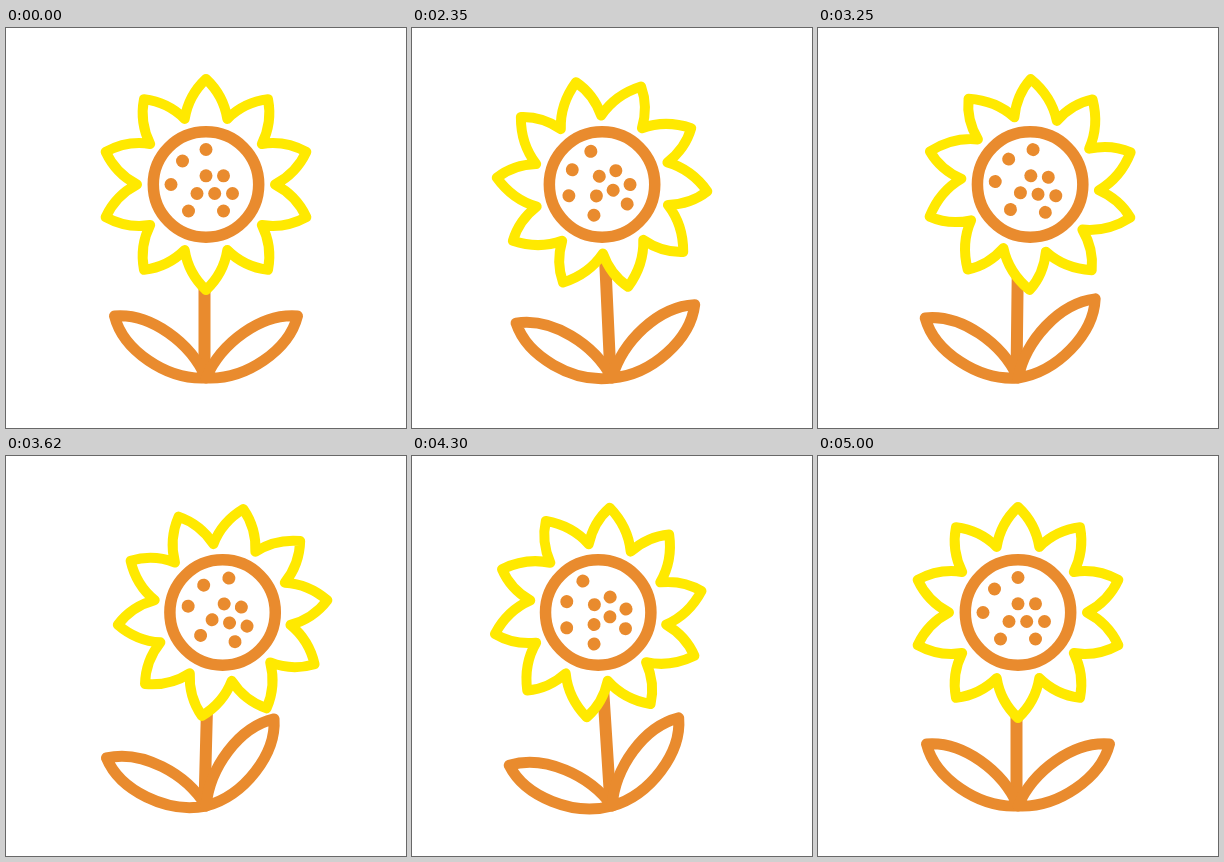
Recreate the animation shown at these times as an HTML page. Size 400x400 px, loop 5.02 s.

```html
<!DOCTYPE html>
<html lang="en">
<head>
<meta charset="utf-8">
<title>Swaying sunflower</title>
<style>
  html, body { margin: 0; width: 100%; height: 100%; overflow: hidden; background: #fff; }
  svg { display: block; width: 100%; height: 100%; }
</style>
</head>
<body>
<svg viewBox="0 0 400 400" fill="none" stroke-linecap="round" stroke-linejoin="round">
  <g stroke="#e98b2e" stroke-width="11">
    <path id="stem" d="M198.500 348V200" stroke-width="12"/>
    <path id="leftLeaf" d="M200 350C185 315 145 285 108.500 288C117 322 160 352 200 350Z"/>
    <path id="rightLeaf" d="M200 350C215 315 255 285 291.500 288C283 322 240 352 200 350Z"/>
  </g>
  <g id="head">
    <g id="flower">
      <path id="petals" fill="#fff" stroke="#ffe900" stroke-width="10"/>
      <g id="seeds" fill="#e98b2e"></g>
    </g>
    <circle r="52.700" stroke="#e98b2e" stroke-width="11.500"/>
  </g>
</svg>
<script>
const LOOP = 5020, START = 2000;
const PETALS = 10;
const el = id => document.getElementById(id);

// Key times with the value each part reaches, eased in and out between them.
const SWAY_TIMES = [START, 2620, 3520, 4070, 4940];
const LEAF_TIMES = [START, 2720, 3250, 4040, 4800];
const tracks = {
  headX: [SWAY_TIMES, [0, -16.5, 19.5, -16.5, 0]],
  flower: [SWAY_TIMES, [0, -31, 14, -31, 0]],
  stem: [SWAY_TIMES, [0, -4.4, 2, -4.4, 0]],
  leftLeaf: [LEAF_TIMES, [0, -9, -1.2, -17, 0]],
  rightLeaf: [LEAF_TIMES, [0, -15.5, -11.6, -25.5, 0]],
  // Petal tips trail behind the turning flower.
  tipDrag: [[START, 2320, 2780, 3300, 3850, 4450, 4980], [0, 4.5, -4.5, -4.5, 4.2, -5.2, 0]]
};

function valueAt([times, values], t) {
  if (t <= times[0]) return values[0];
  const i = times.findIndex(time => t < time);
  if (i < 0) return values[values.length - 1];
  const p = (t - times[i - 1]) / (times[i] - times[i - 1]);
  return values[i - 1] + (values[i] - values[i - 1]) * (1 - Math.cos(Math.PI * p)) / 2;
}

function polar(radius, degrees) {
  const a = degrees * Math.PI / 180;
  return `${(radius * Math.sin(a)).toFixed(2)} ${(-radius * Math.cos(a)).toFixed(2)}`;
}

function petalPath(drag) {
  const step = 360 / PETALS;
  let d = `M${polar(69, -step / 2)}`;
  for (let i = 0; i < PETALS; i++) {
    const a = i * step, tip = polar(105.5, a + drag);
    d += `Q${polar(90.7, a - 11.2 + drag / 2)} ${tip}`;
    d += `Q${polar(90.7, a + 11.2 + drag / 2)} ${polar(69, a + step / 2)}`;
  }
  return d + 'Z';
}

const seedSpots = [
  [0, -35], [-23.5, -23.5], [-35, 0], [0, -8.7], [17.5, -8.7],
  [-9, 9], [8.7, 9], [26.5, 9], [-17.5, 26.5], [17.5, 26.5]
];
el('seeds').innerHTML = seedSpots
  .map(([x, y]) => `<circle cx="${x}" cy="${y}" r="6.500"/>`).join('');

function turn(id, degrees, pivot = '') {
  el(id).setAttribute('transform', `rotate(${degrees} ${pivot})`);
}

function draw(t) {
  const at = name => valueAt(tracks[name], t);
  el('head').setAttribute('transform', `translate(${200 + at('headX')} 156.5)`);
  el('petals').setAttribute('d', petalPath(at('tipDrag')));
  turn('flower', at('flower'));
  turn('stem', at('stem'), '198.5 348');
  turn('leftLeaf', at('leftLeaf'), '200 350');
  turn('rightLeaf', at('rightLeaf'), '200 350');
}

const begin = performance.now();
function tick() {
  draw((performance.now() - begin) % LOOP);
  requestAnimationFrame(tick);
}
tick();
</script>
</body>
</html>
```
